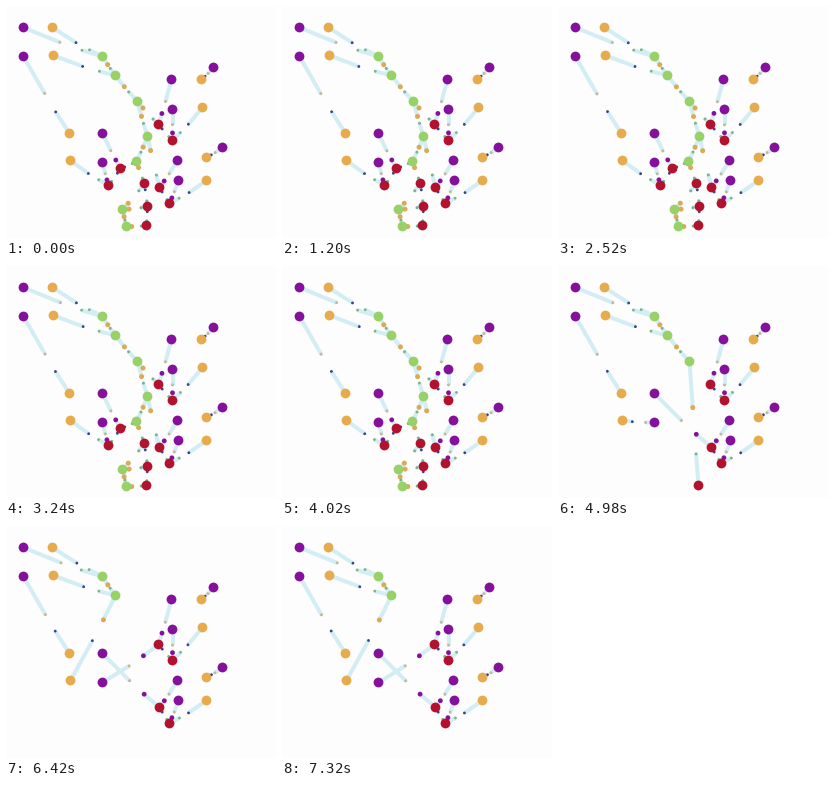
Recreate the animation shown at these times as a matplotlib script. Size 270x232 px, loop 7380 ms.

```python
import matplotlib.pyplot as plt
import numpy as np
from matplotlib.animation import FuncAnimation
from matplotlib.collections import LineCollection

W, H, DPI = 270, 232, 64
FRAMES, STEP = 123, 60
PX = 72 / DPI

NODES = {
    "P": [(17, 21), (17, 50), (96, 127), (96, 156), (165, 73),
          (166, 103), (207, 61), (216, 141), (171, 154), (172, 174)],
    "O": [(46, 21), (47, 49), (63, 127), (64, 154),
          (196, 101), (195, 73), (200, 151), (200, 174)],
    "G": [(96, 50), (109, 69), (131, 95), (141, 130),
          (130, 155), (116, 203), (120, 220)],
    "R": [(152, 118), (166, 134), (114, 162), (102, 179), (138, 177),
          (153, 181), (163, 197), (141, 200), (140, 219)],
}
FILL = {"P": "#85109c", "O": "#e6ab4c", "G": "#98d168", "R": "#b3122f"}
TAN, PALE, BLUE, TEAL = "#d9ab58", "#c3b99d", "#35428c", "#79b58a"
LINK = "#d3edf4"

# Links that last the whole loop, then those of each stage.
FIXED = ("P0-G0 O0-G0 O1-G1 G0-G1 P1-O2 P4-R0 P5-R1 O4-R1 R0-R1 "
         "P6-O5 P7-O6 P8-R5 P9-R6 O7-R6 R5-R6")
STAGES = [
    (0, "G1-G2 G2-G3 G2-R0 G3-R5 P2-R2 P3-R3 O3-R3 R2-R3 R2-G4 G3-G4 "
        "G4-R4 G5-R4 G5-G6 G6-R8 R7-R8 R4-R7 G5-R7"),
    (4500, "G1-G2 G2-R8 P2-R5 P3-O3"),
    (5700, "G1-O3 P2-R5 P3-R0"),
]


def pos(name):
    return np.array(NODES[name[0]][int(name[1:])], float) + 0.5


def reach(a, b):
    """Share of the link covered from a towards b."""
    if a[0] == "P":
        return 0.27 if b == "O3" else 0.46
    if a[0] == "O":
        return 0.3 if b[0] == "P" else 0.47
    if a[0] == b[0] == "G":
        return 0.4
    if a == "G2" and b == "R8":
        return 0.35
    return 0.26


def tip(a, b, first):
    """Colour and radius of the dot that a sends towards b."""
    kind = a[0] + b[0]
    if a[0] == "P":
        return PALE, 1.5
    if a[0] == "O":
        return BLUE, 1.4
    if kind == "RP":
        return FILL["P"], 2.4
    if a[0] == "G" and first:
        return TAN, 2.5
    if kind in ("GP", "GO", "RO"):
        return TEAL, 1.4
    return (BLUE, 1.4) if first else (TEAL, 1.5)


def build(links):
    pairs = [p.split("-") for p in (FIXED + " " + links).split()]
    halves = [(a, b, True) for a, b in pairs] + [(b, a, False) for a, b in pairs]
    names = sorted({n for p in pairs for n in p})
    start = np.array([pos(a) for a, b, _ in halves])
    span = np.array([(pos(b) - pos(a)) * reach(a, b) for a, b, _ in halves])
    tips = [tip(*h) for h in halves]
    return {
        "start": start, "span": span,
        "tip_fill": [c for c, _ in tips],
        "tip_size": [(2 * r * PX) ** 2 for _, r in tips],
        "nodes": np.array([pos(n) for n in names]),
        "fill": [FILL[n[0]] for n in names],
    }


scenes = [(t, build(links)) for t, links in STAGES]

fig = plt.figure(figsize=(W / DPI, H / DPI), dpi=DPI, facecolor="#fdfdfd")
ax = fig.add_axes([0, 0, 1, 1])
ax.set(xlim=(0, W), ylim=(H, 0))
ax.axis("off")

lines = LineCollection([], colors=LINK, linewidths=4 * PX, capstyle="butt")
ax.add_collection(lines)
dots = ax.scatter([], [], linewidths=0, zorder=3)
discs = ax.scatter([], [], s=(9.8 * PX) ** 2, linewidths=0, zorder=4)


def draw(i):
    t = i * STEP
    s = [scene for begin, scene in scenes if t >= begin][-1]
    drift = 1 + 0.04 * i / FRAMES
    ends = s["start"] + s["span"] * drift
    ends[:, 1] += np.minimum(1.5, 0.06 * np.hypot(*s["span"].T))
    lines.set_segments(np.stack([s["start"], ends], axis=1))
    dots.set_offsets(ends)
    dots.set_sizes(s["tip_size"])
    dots.set_facecolor(s["tip_fill"])
    discs.set_offsets(s["nodes"])
    discs.set_facecolor(s["fill"])
    return lines, dots, discs


anim = FuncAnimation(fig, draw, frames=FRAMES, interval=STEP,
                     repeat=True, repeat_delay=0, blit=False)
plt.show()
```
